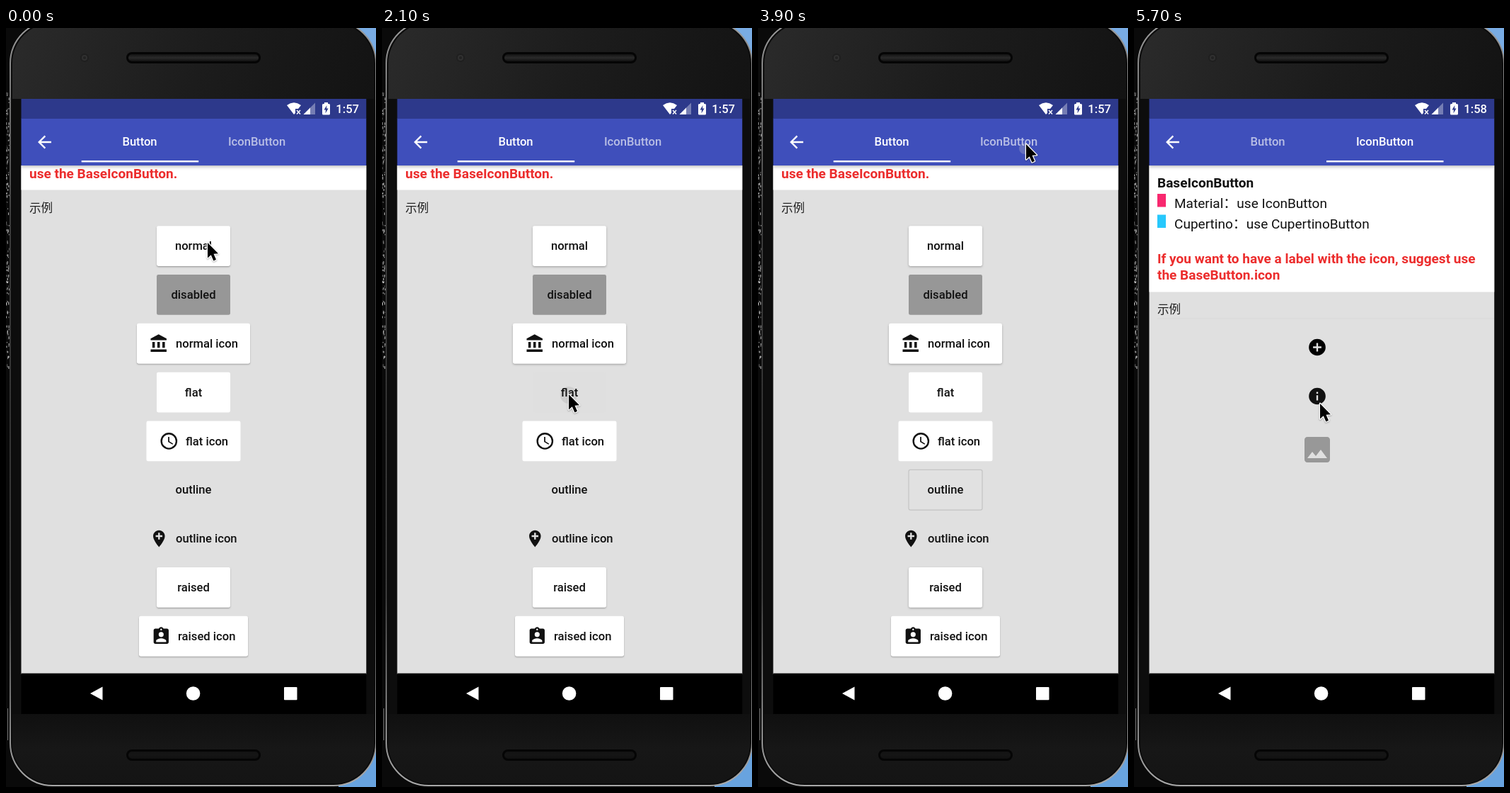
Recreate the animation shown at these times as an HTML page with a canvas. Size 523 px wide and 1071 px high, loop 6000 ms.

```html
<!DOCTYPE html>
<html lang="zh-CN">
<head>
<meta charset="utf-8">
<title>Buttons</title>
<style>
html, body { margin: 0; width: 100%; height: 100%; overflow: hidden; background: #000; }
canvas { display: block; width: 523px; height: 1071px; }
</style>
</head>
<body>
<canvas id="stage"></canvas>
<script>
const W = 523, H = 1071, LOOP = 6000, STEP = 300;
const canvas = document.getElementById('stage');
const ctx = canvas.getContext('2d');
const dpr = window.devicePixelRatio || 1;
canvas.width = W * dpr;
canvas.height = H * dpr;

const FAMILY = 'Roboto, "Noto Sans CJK SC", "Noto Sans CJK", sans-serif';
const SMALL = 16.6, BODY = 19.05, ICON = 28.4;
const INK = '#111', RED = '#ec2d2d', PAGE = '#e0e0e0';
const LEFT = 21.3, WIDTH = 488.2, NAV = 910.6;

const ICONS = {
  back: 'M20 11H7.83l5.59-5.59L12 4l-8 8 8 8 1.41-1.41L7.83 13H20v-2z',
  bank: 'M4 10v7h3v-7H4zm6 0v7h3v-7h-3zM2 22h19v-3H2v3zm14-12v7h3v-7h-3zm-4.5-9L2 6v2h19V6l-9.5-5z',
  clock: 'M12 2a10 10 0 1 0 0 20a10 10 0 1 0 0-20zm0 18a8 8 0 1 1 0-16a8 8 0 1 1 0 16zm.5-13H11v6l5.25 3.15.75-1.23-4.5-2.67z',
  pin: 'M12 2C8.14 2 5 5.14 5 9c0 5.25 7 13 7 13s7-7.75 7-13c0-3.86-3.14-7-7-7zm4 8h-3v3h-2v-3H8V8h3V5h2v3h3v2z',
  badge: 'M19 3h-4.18C14.4 1.84 13.3 1 12 1c-1.3 0-2.4.84-2.82 2H5c-1.1 0-2 .9-2 2v14c0 1.1.9 2 2 2h14c1.1 0 2-.9 2-2V5c0-1.1-.9-2-2-2zm-7 0a1 1 0 1 1 0 2a1 1 0 1 1 0-2zm0 4a3 3 0 1 1 0 6a3 3 0 1 1 0-6zm6 12H6v-1.4c0-2 4-3.1 6-3.1s6 1.1 6 3.1V19z',
  plus: 'M12 2a10 10 0 1 0 0 20a10 10 0 1 0 0-20zm5 11h-4v4h-2v-4H7v-2h4V7h2v4h4v2z',
  info: 'M12 2a10 10 0 1 0 0 20a10 10 0 1 0 0-20zm1 15h-2v-6h2v6zm0-8h-2V7h2v2z',
  photo: 'M21 19V5c0-1.1-.9-2-2-2H5c-1.1 0-2 .9-2 2v14c0 1.1.9 2 2 2h14c1.1 0 2-.9 2-2zM8.5 13.5l2.5 3.01L14.5 12l4.5 6H5l3.5-4.5z'
};
for (const k in ICONS) ICONS[k] = new Path2D(ICONS[k]);

// Pointer tip at each step
const POINTER = [
  [285, 303], [281, 304], [281, 304], [269, 350], [263, 404],
  [265, 434], [264, 483], [264, 517], [265, 601], [265, 643],
  [265, 788], [265, 788], [382, 258], [379, 164], [342, 323],
  [261, 450], [261, 450], [263, 530], [263, 530], [263, 530]
];

// press: step at which the button is held down; ripple: [x, y, r]
const BUTTONS = [
  { label: 'normal', w: 104, kind: 'raised', press: 2, ripple: [279, 305, 17] },
  { label: 'disabled', w: 104, kind: 'disabled' },
  { label: 'normal icon', w: 160, icon: 'bank', tx: 240, kind: 'raised', press: 5, ripple: [264, 435, 13] },
  { label: 'flat', w: 104, kind: 'flat', press: 7, ripple: [264, 518, 12] },
  { label: 'flat icon', w: 133, icon: 'clock', tx: 254, kind: 'flat' },
  { label: 'outline', w: 104, kind: 'outline', press: 9, ripple: [264, 645, 7] },
  { label: 'outline icon', w: 154, icon: 'pin', tx: 240, kind: 'outline' },
  { label: 'raised', w: 104, kind: 'raised', press: 11, ripple: [264, 790, 15] },
  { label: 'raised icon', w: 154, icon: 'badge', tx: 243, kind: 'raised' }
];

function rect(x, y, w, h, fill) {
  ctx.fillStyle = fill;
  ctx.fillRect(x, y, w, h);
}

function round(x, y, w, h, r, fill) {
  ctx.beginPath();
  ctx.roundRect(x, y, w, h, r);
  if (fill) { ctx.fillStyle = fill; ctx.fill(); }
}

function disc(x, y, r, fill) {
  ctx.beginPath();
  ctx.arc(x, y, r, 0, 7);
  ctx.fillStyle = fill;
  ctx.fill();
}

function poly(points, fill) {
  ctx.beginPath();
  points.forEach(p => ctx.lineTo(p[0], p[1]));
  ctx.closePath();
  if (fill) { ctx.fillStyle = fill; ctx.fill(); }
}

function text(str, x, y, size, weight, fill, align = 'left') {
  ctx.font = `${weight} ${size}px ${FAMILY}`;
  ctx.textAlign = align;
  ctx.fillStyle = fill;
  ctx.fillText(str, x, y);
}

function icon(name, cx, cy, size, fill) {
  ctx.save();
  ctx.translate(cx - size / 2, cy - size / 2);
  ctx.scale(size / 24, size / 24);
  ctx.fillStyle = fill;
  ctx.fill(ICONS[name]);
  ctx.restore();
}

function shadow(blur, dy, alpha) {
  ctx.shadowColor = `rgba(0,0,0,${alpha})`;
  ctx.shadowBlur = blur * dpr;
  ctx.shadowOffsetY = dy * dpr;
}

function gradient(x0, y0, x1, y1, ...colors) {
  const g = ctx.createLinearGradient(x0, y0, x1, y1);
  colors.forEach((c, i) => g.addColorStop(i / (colors.length - 1), c));
  return g;
}

function slot(y, mid) {
  round(170, y, 190, 16, 8, '#050505');
  round(173, y + 3, 184, 10, 5, gradient(0, y + 3, 0, y + 13, '#131313', mid, '#111'));
}

function drawBackdrop() {
  rect(0, 0, W, H, '#0a0a0a');
  let seed = 7;
  const rnd = () => (seed = seed * 16807 % 2147483647) / 2147483647;
  for (let i = 0; i < 130; i++) {
    const v = 70 + rnd() * 150 | 0;
    rect(rnd() * 4, 90 + rnd() * 390, 1, 1 + rnd() * 3, `rgb(${v},${v},${v})`);
  }
  rect(2, 960, 1, 45, '#777');
  rect(490, 0, 33, 40, '#79ace4');
  rect(470, 1010, 53, 61, '#68a3df');
}

function drawPhone() {
  round(6, -10, 517, 1079, 60, '#0c0c0c');
  ctx.lineWidth = 2;
  ctx.strokeStyle = gradient(0, 0, 0, H, '#999', '#3c3c3c', '#333', '#3c3c3c', '#aaa');
  ctx.stroke();
  ctx.save();
  round(9, -7, 511, 1073, 57, gradient(0, 0, W, 180, '#2b2b2b', '#1c1c1c', '#121212'));
  ctx.clip();
  rect(9, 100, 511, 868, '#0d0d0d');
  rect(9, 968, 511, 103, gradient(0, 968, 0, 1068, '#101010', '#171717', '#141414'));
  ctx.restore();
  disc(111, 42, 6, '#1f1f1f');
  disc(111, 42, 4, '#303030');
  disc(111, 42, 2, '#222');
  slot(34, '#2a2a2a');
  slot(1018, '#151515');
}

function drawStatus(step) {
  rect(LEFT, 100, WIDTH, 28, '#2d398b');
  poly([[397, 109], [402, 106.2], [407, 105.3], [412, 106.2], [417, 109], [413, 114], [409, 114], [409, 120], [407, 122]], '#fff');
  ctx.strokeStyle = '#fff';
  ctx.lineWidth = 1.5;
  ctx.beginPath();
  ctx.moveTo(411, 116); ctx.lineTo(416, 121.5);
  ctx.moveTo(416, 116); ctx.lineTo(411, 121.5);
  ctx.stroke();
  poly([[420.5, 122], [437, 122], [437, 105.5]], 'rgba(255,255,255,.35)');
  poly([[420.5, 122], [430, 122], [430, 112.5]], '#fff');
  rect(450, 105, 5, 3, '#fff');
  round(447, 107, 11, 15.5, 1.5, '#fff');
  poly([[453.5, 109], [449.5, 115.5], [452, 115.5], [451.5, 120.5], [455.6, 113.5], [453, 113.5]], '#2d398b');
  text(step < 15 ? '1:57' : '1:58', 499, 120, SMALL, 500, '#fff', 'right');
}

function drawBar(step) {
  const second = step >= 14;
  ctx.save();
  shadow(5, 2, .3);
  rect(LEFT, 127.5, WIDTH, 66.5, '#3f4fbb');
  ctx.restore();
  drawStatus(step);
  icon('back', 54.5, 161, ICON, '#fff');
  if (step === 13) disc(377, 170, 8, 'rgba(200,200,200,.28)');
  const dim = '#b9bfe5';
  text('Button', 189, 166, SMALL, 500, second ? dim : '#fff', 'center');
  text('IconButton', 354.5, 166, SMALL, 500, second ? '#fff' : dim, 'center');
  rect(second ? 272 : 106.7, 187, 165.5, 2.4, '#fff');
}

function drawButton(b, i, step) {
  const cy = 307.6 + i * 68.83, x = 265 - b.w / 2, y = cy - 28.4, h = 56.8;
  const held = step === b.press, used = step > b.press;
  ctx.save();
  if (b.kind === 'outline') {
    if (held || used) {
      round(x, y, b.w, h, 2.4, held ? '#cacaca' : '#e1e1e1');
      ctx.strokeStyle = held ? '#4587ee' : '#c4c4c4';
      ctx.lineWidth = 1.2;
      ctx.stroke();
    }
  } else {
    if (b.kind === 'raised') {
      if (held) shadow(10, 4, .42);
      else if (used) shadow(3, 1.3, .27);
      else shadow(2, 1.2, .3);
    }
    round(x, y, b.w, h, 2.4, b.kind === 'disabled' ? '#979797' : held ? '#dfdfdf' : '#fff');
  }
  ctx.restore();
  if (held) disc(...b.ripple, b.kind === 'outline' ? '#b8b8b8' : '#cecece');
  if (b.icon) {
    icon(b.icon, b.tx - 9.5 - ICON / 2, cy, ICON, INK);
    text(b.label, b.tx, cy + 5.7, SMALL, 500, INK);
  } else {
    text(b.label, 265, cy + 5.7, SMALL, 500, INK, 'center');
  }
}

function drawButtonPage(step) {
  rect(LEFT, 194, WIDTH, 34.5, '#fff');
  text('use the BaseIconButton.', 33, 212, BODY, 700, RED);
  text('示例', 33, 260, SMALL, 400, '#222');
  BUTTONS.forEach((b, i) => drawButton(b, i, step));
}

function drawIconPage(step) {
  rect(LEFT, 194, WIDTH, 178.5, '#fff');
  text('BaseIconButton', 33, 225, BODY, 700, INK);
  rect(33, 234, 12, 18.5, '#f8286f');
  text('Material：use IconButton', 57, 253.5, BODY, 400, INK);
  rect(33, 263.5, 12, 18.5, '#27c8fc');
  text('Cupertino：use CupertinoButton', 57, 283, BODY, 400, INK);
  text('If you want to have a label with the icon, suggest use', 33, 331.5, BODY, 700, RED);
  text('the BaseButton.icon', 33, 355, BODY, 700, RED);
  text('示例', 33, 403, SMALL, 400, '#222');
  rect(33, 409.5, 476, 1, '#d9d9d9');
  if (step === 16) disc(259, 450.5, 41, '#cecece');
  icon('plus', 259, 450.5, ICON, '#000');
  icon('info', 259, 519.5, ICON, INK);
  icon('photo', 259, 595, 48, '#989898');
}

function drawNav() {
  rect(LEFT, NAV, WIDTH, 968 - NAV, '#000');
  poly([[119, 939], [136.5, 929.5], [136.5, 948.5]], '#fff');
  disc(264.6, 939, 9.8, '#fff');
  round(393, 930, 18.5, 18.3, 1, '#fff');
}

function drawPointer([x, y]) {
  ctx.save();
  ctx.translate(x, y);
  poly([[0, 0], [0, 21.5], [4.8, 17.2], [8.4, 25.4], [12, 23.8], [8.5, 15.8], [15, 15.3]]);
  shadow(2, 1, .3);
  ctx.lineJoin = 'round';
  ctx.lineWidth = 2.6;
  ctx.strokeStyle = '#fff';
  ctx.stroke();
  ctx.shadowColor = 'transparent';
  ctx.fillStyle = '#000';
  ctx.fill();
  ctx.restore();
}

function draw(now) {
  const step = Math.floor(now % LOOP / STEP);
  ctx.setTransform(dpr, 0, 0, dpr, 0, 0);
  drawBackdrop();
  drawPhone();
  ctx.save();
  ctx.beginPath();
  ctx.rect(LEFT, 100, WIDTH, 868);
  ctx.clip();
  rect(LEFT, 194, WIDTH, 718, PAGE);
  (step < 14 ? drawButtonPage : drawIconPage)(step);
  drawBar(step);
  drawNav();
  ctx.restore();
  drawPointer(POINTER[step]);
}

const start = performance.now();
function tick() {
  draw(performance.now() - start);
  requestAnimationFrame(tick);
}
tick();
</script>
</body>
</html>
```
